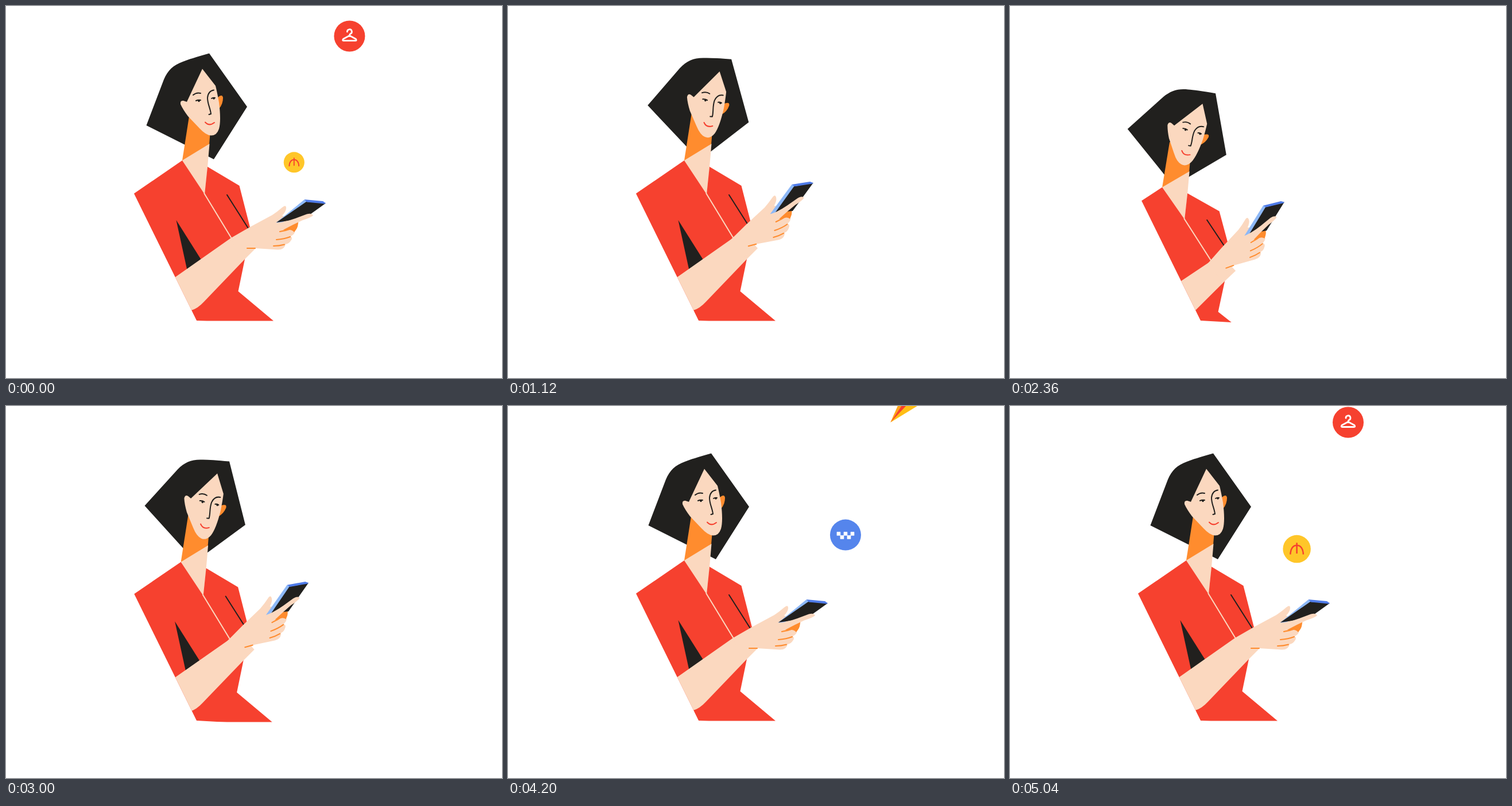
Animation, 864 px wide and 648 px high, one loop 5080 ms. Source, as an HTML page:

```html
<!DOCTYPE html>
<html lang="en">
<head>
<meta charset="utf-8">
<title>Woman with phone</title>
<style>
  html, body { margin: 0; width: 100%; height: 100%; overflow: hidden; background: #fff; }
  svg { display: block; width: 100vw; height: 100vh; }
  .red { fill: #f6412f; }
  .ink { fill: #21201e; }
  .skin { fill: #fbd8bf; }
  .orange { fill: #ff8c2e; }
  .line { fill: none; stroke: #21201e; stroke-width: 2; stroke-linecap: round; stroke-linejoin: round; }
  .crease { stroke: #ff8c2e; }
</style>
</head>
<body>
<svg viewBox="0 0 864 648">
  <defs>
    <clipPath id="wall"><path d="M62 0L332 548L385 551H864V0Z"/></clipPath>
    <g id="coin">
      <circle r="27" fill="#ffc629"/>
      <path d="M-12.5 10.5C-12.5-1-7-7 0-7S12.5-1 12.5 10.5M0-12V9" fill="none" stroke="#f6412f" stroke-width="2.8"/>
    </g>
    <g id="hanger">
      <circle r="27" fill="#f6412f"/>
      <path d="M-4-7.5A4 4 0 1 1 1.5-4Q0-3 0-1L11 5Q13 8 10 8H-10Q-13 8-11 5L0-1" fill="none" stroke="#fff" stroke-width="2.8" stroke-linecap="round" stroke-linejoin="round"/>
    </g>
    <g id="taxi">
      <circle r="27" fill="#5585ec"/>
      <path d="M-15-5h6v6h-6zM-3-5h6v6h-6zM9-5h6v6h-6zM-9 1h6v6h-6zM3 1h6v6h-6z" fill="#fff" stroke="#fff" stroke-width=".6" stroke-linejoin="round"/>
    </g>
    <g id="plane">
      <path d="M0 0L34-77L75-46Z" fill="#ffbe15"/>
      <path d="M0 0L34-77L48-72Z" fill="#ffa51c"/>
      <path d="M0 0L48-72L60-64Z" class="red"/>
    </g>
  </defs>

  <g id="icons"></g>

  <g clip-path="url(#wall)">
    <g id="body">
      <g class="nod">
        <g class="turn">
          <path class="ink" d="M244.500 208L275 128C282 112 291 103 308 97Q320 92 354 82.500L420 175.500L362 267Z"/>
        </g>
      </g>
      <path class="orange" d="M320 186L307 269L330 275L354 241L357 205Z"/>
      <path class="skin" d="M307 269L354.500 240L351 281L346 330Z"/>
      <g class="nod">
        <g class="turn">
          <path class="orange" d="M368 160Q377 152 378 160Q378 171 371 179Z"/>
          <path class="skin" d="M342 109.500L365 139Q368 151 371 168Q375 200 371 214Q367 226 357 225.500Q348 225 337 213L317 192Q308 180 304 171Q303 164 309 165L315 167Z"/>
          <path class="line" d="M326 155Q332 150 339 152M331 165Q335 163 339 164M358 161Q361 159 364 160M362 146.500Q352 148 351 160C351 171 356 178 357 188L353.500 189"/>
          <circle class="ink" cx="336" cy="165.500" r="1.800"/>
          <circle class="ink" cx="362" cy="161" r="1.800"/>
          <path class="line" style="stroke:#f6412f" d="M347 202.500Q354 210 363 203"/>
        </g>
      </g>
      <path class="red" d="M222.500 327L307 269L346 328L351 280L406.500 313L430 405L416 441L404.500 497L466 548.500H332Z"/>
      <path d="M345 326L393 405" fill="none" stroke="#fbd8bf" stroke-width="2"/>
      <path class="line" d="M385 329L425 392"/>
      <path class="ink" d="M296.500 373L340 442L315.500 460Z"/>

      <path class="skin" d="M294.500 472.500L392 404L415 400L435 422L415 442L345 515Q334 527 323 530Z"/>
      <g id="hand">
        <path class="skin" d="M392 404L425 385L464 364Q473 358 481 351Q488 345 488 352Q488 358 481 365L510 377Q505 386 494 390Q504 387 503 394Q502 398 496 401Q500 404 496 409Q493 414 487 415Q485 425 473 424.500L434 422L405 440Z"/>
        <path class="orange" d="M480 389L509 376Q509 385 505 390L502 394Q497 388 489 391Z"/>
        <path fill="#8db8f7" d="M470.500 377.500L520 337L527 342L482 377Z"/>
        <path id="screen" class="ink"/>
        <path fill="#4f7be8" d="M520 337L552 340L557 343.500L555 344.500L524 341.500Z"/>
        <path class="skin" d="M463 379Q485 377 504 370L524 362.500Q533 360 535 365Q530 369 517 373L500 381L477 393Z"/>
        <path class="line crease" d="M477 393Q489 391 499 387M471 407Q485 406 495 402M466 418Q476 418 485 415.500M420 422H434"/>
      </g>
    </g>
  </g>
</svg>
<script>
const LOOP = 5080;
const $ = s => document.querySelector(s);
const clamp = v => Math.min(1, Math.max(0, v));
const mix = (a, b, u) => a + (b - a) * u;
const bezier = (a, b, c, u) => mix(mix(a, b, u), mix(b, c, u), u);
const ramp = (t, from, to) => {
  const u = clamp((t - from) / (to - from));
  return u * u * (3 - 2 * u);
};

// Accelerates away, then eases back; the two cubics meet in a rounded peak.
function lean(t) {
  const away = 75 * (Math.max(0, t - 1240) / 520) ** 3;
  const back = 109 * (Math.max(0, 3400 - t) / 1400) ** 3;
  return away * back / Math.hypot(away ** 3, back ** 3) ** (1 / 3);
}

// Each icon drops along a curve into the phone: x is where it starts, bend pulls it sideways.
const icons = [
  { id: "coin", start: 3280, time: 700, x: 590, bend: 460 },
  { id: "taxi", start: 3772, time: 600, x: 545, bend: 688 },
  { id: "plane", start: 4075, time: 640, x: 708, bend: 600 },
  { id: "coin", start: 4498, time: 700, x: 590, bend: 460 },
  { id: "hanger", start: 4923, time: 600, x: 545, bend: 688 }
];
for (const icon of icons) {
  icon.el = document.createElementNS("http://www.w3.org/2000/svg", "use");
  icon.el.setAttribute("href", "#" + icon.id);
  $("#icons").append(icon.el);
}

const spin = (deg, x, y) => `rotate(${deg} ${x} ${y})`;
const move = (sel, value) =>
  document.querySelectorAll(sel).forEach(el => el.setAttribute("transform", value));

function drawWoman(t) {
  const d = lean(t);
  const p = ramp(t, 560, 1100) - ramp(t, 3280, 3840);
  const tilt = 6 * (1 - Math.exp(-d / 11));
  move("#body", `matrix(1 0 0 ${1 - d / 920} ${-.94 * d} ${1.34 * d})`);
  move(".nod", spin(tilt, 350, 200));
  move(".turn", `translate(${-p} ${-4 * p}) ` + spin(20 * p, 332, 192));
  move("#hand", spin(-14.5 * p - .95 * tilt, 405, 425));
  $("#screen").setAttribute("d",
    `M${mix(471, 480, p)} 377L523 341L557 343.500L${mix(520, 510, p)} ${mix(370, 382, p)}Z`);
}

function drawIcon({ el, start, time, x, bend }, t) {
  const u = (t - start + LOOP) % LOOP / time;
  el.style.display = u < 1 ? "" : "none";
  if (u >= 1) return;
  const size = clamp(4 * (1 - u));
  el.setAttribute("transform",
    `translate(${bezier(x, bend, 515, u)} ${bezier(-40, 130, 342, u)}) scale(${size})`);
}

function draw(t) {
  drawWoman(t);
  icons.forEach(icon => drawIcon(icon, t));
}

const begin = performance.now();
function tick() {
  draw((performance.now() - begin) % LOOP);
  requestAnimationFrame(tick);
}
tick();
</script>
</body>
</html>
```
